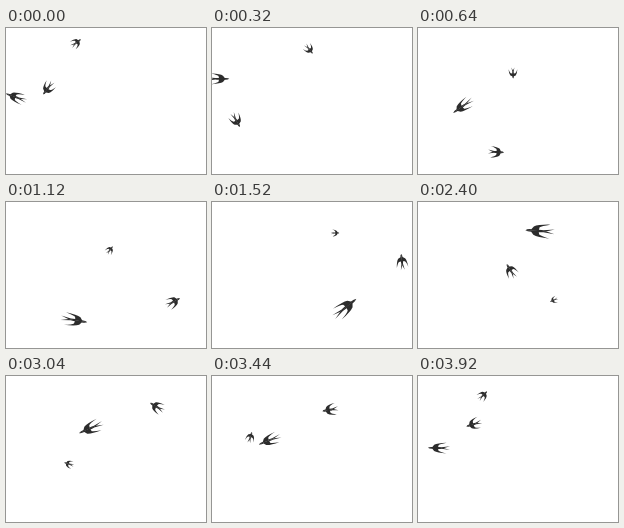
Animation, 200 px wide and 146 px high, one loop 4000 ms. Source, as an HTML page:

```html
<!DOCTYPE html>
<html lang="en">
<head>
<meta charset="utf-8">
<title>Swallows</title>
<style>
  html, body { margin: 0; height: 100%; overflow: hidden; background: #fff; }
  svg { display: block; width: 100vw; height: 100vh; }
</style>
</head>
<body>
<svg viewBox="0 0 200 146" fill="#2c2c2c">
  <defs>
    <g id="swallow">
      <path id="half" d="M50 1Q44-10 30-9L22-30Q8-46-34-50Q-4-37 2-26L4-9Q-6-9-12-7L-50-17L-20 1Z"/>
      <use href="#half" transform="scale(1 -1)"/>
    </g>
  </defs>
</svg>
<script>
const LOOP = 4000, STEP = 80;

// Each path is a closed curve through "time x,y" waypoints;
// length swings by `depth` as the bird comes nearer or goes away
const flights = [
  { length: 10, depth: 2, spread: .8,
    path: "0 70,15 320 97,21 640 95,45 960 98,54 1520 123,31 1840 146,53 2400 136,98 3040 63,88 3360 37,68" },
  { length: 26, depth: -4, spread: .48,
    path: "240 -16,52 480 68,56 640 45,78 800 24,88 1120 68,118 1520 133,106 1840 146,56 2400 122,29 3040 85,52 3920 21,72" },
  { length: 16, depth: 0, spread: .72,
    path: "0 42,60 320 24,92 640 78,124 1120 167,100 1520 190,60 1840 162,48 2400 93,69 3040 151,31 3920 56,48" }
];

const parse = path => path.match(/-?\d+ -?\d+,-?\d+/g).map(key => key.split(/[ ,]/).map(Number));

function keyAt(keys, i) {
  const n = keys.length, lap = Math.floor(i / n);
  const [t, x, y] = keys[i - lap * n];
  return [t + lap * LOOP, x, y];
}

// Cubic Hermite through unevenly timed waypoints
function pointAt(keys, time) {
  time = (time + LOOP) % LOOP;
  const i = keys.findLastIndex(key => key[0] <= time);
  const [a, b, c, d] = [-1, 0, 1, 2].map(k => keyAt(keys, i + k));
  const span = c[0] - b[0], u = (time - b[0]) / span;
  return [1, 2].map(j => {
    const m0 = (c[j] - a[j]) / (c[0] - a[0]) * span;
    const m1 = (d[j] - b[j]) / (d[0] - b[0]) * span;
    const rise = c[j] - b[j];
    return b[j] + u * (m0 + u * (3 * rise - 2 * m0 - m1 + u * (m0 + m1 - 2 * rise)));
  });
}

const svg = document.querySelector("svg");
const birds = flights.map(({ path, ...shape }) => {
  const node = document.createElementNS(svg.namespaceURI, "use");
  node.setAttribute("href", "#swallow");
  svg.append(node);
  return { node, keys: parse(path), ...shape };
});

function draw() {
  const time = Math.floor(performance.now() % LOOP / STEP) * STEP;
  const nearness = Math.cos(2 * Math.PI * time / LOOP);
  for (const { node, keys, length, depth, spread } of birds) {
    const [x, y] = pointAt(keys, time);
    const [x0, y0] = pointAt(keys, time - 5), [x1, y1] = pointAt(keys, time + 5);
    const heading = Math.atan2(y1 - y0, x1 - x0) * 180 / Math.PI;
    const size = (length + depth * nearness) / 100;
    node.setAttribute("transform",
      `translate(${x} ${y}) rotate(${heading}) scale(${size} ${size * spread})`);
  }
  requestAnimationFrame(draw);
}
draw();
</script>
</body>
</html>
```
